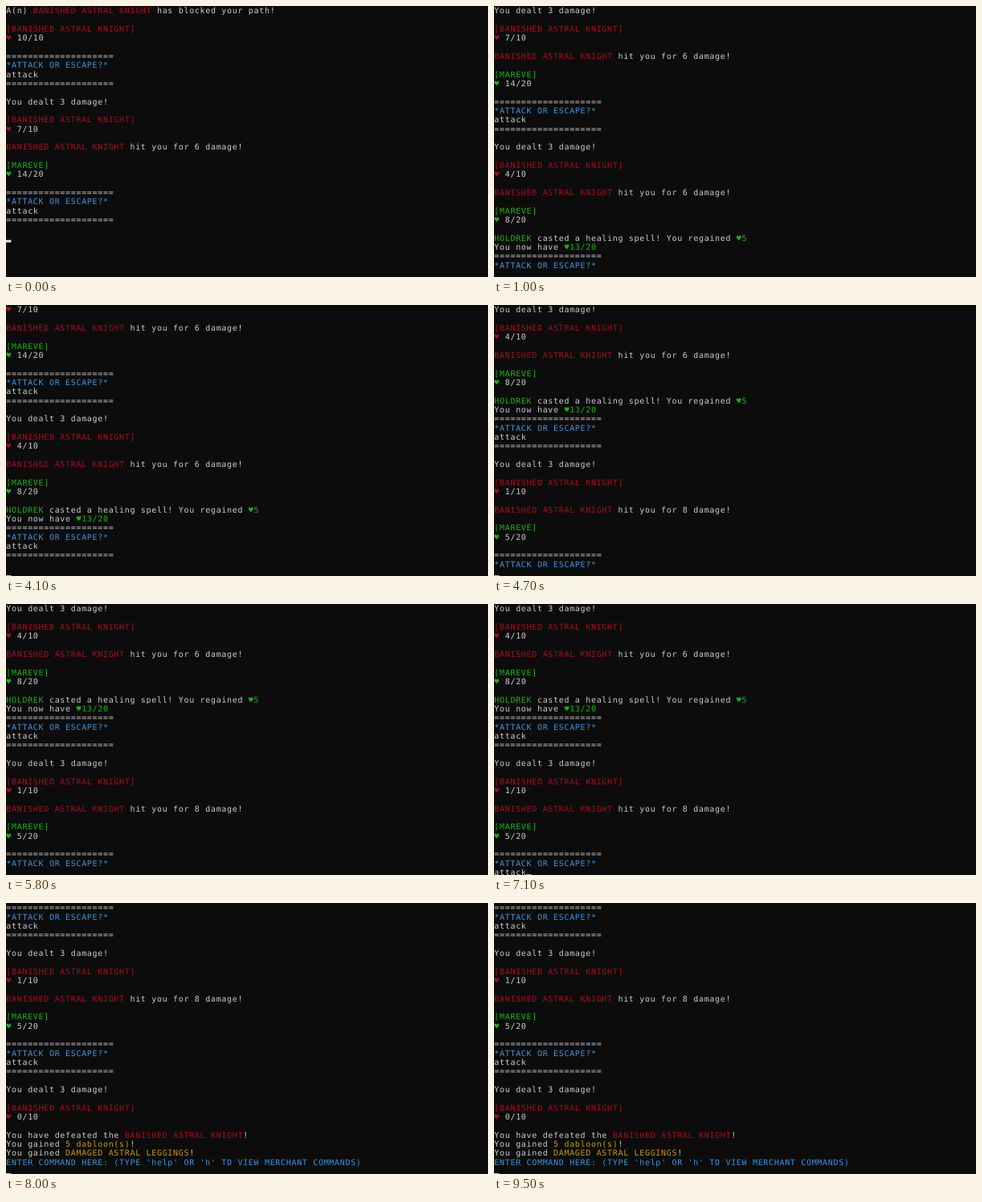
An HTML page with a canvas for the animation above (9.6 s loop, 600 px wide and 338 px high).

```html
<!DOCTYPE html>
<html lang="en">
<head>
<meta charset="utf-8">
<title>Terminal battle</title>
<style>
  html, body { margin: 0; width: 100%; height: 100%; overflow: hidden; background: #0c0c0c; }
  canvas { display: block; }
</style>
</head>
<body>
<canvas id="screen" width="600" height="338"></canvas>
<script>
const ctx = document.getElementById('screen').getContext('2d');

const LOOP = 9600;
const CELL_W = 6.7, CELL_H = 11.34, BASELINE = 9.2;
const VISIBLE_ROWS = 29;
const BLINK = 517, BLINK_START = 220;
const BACKGROUND = '#0c0c0c', TEXT = '#cccccc', CURSOR = '#e6e6e6';

const white = s => [TEXT, s];
const red = s => ['#a80d20', s];
const green = s => ['#18b414', s];
const blue = s => ['#3a96dd', s];
const yellow = s => ['#c19c00', s];

const ENEMY = 'BANISHED ASTRAL KNIGHT', PLAYER = 'MAREVE', HEALER = 'HOLDREK';
const COMMAND = 'attack';

// A line is a list of coloured runs.
const blank = [];
const rule = [white('='.repeat(20))];
const prompt = [rule, [blue('*ATTACK OR ESCAPE?*')]];
const entered = [[white(COMMAND)], rule, blank];
const status = (paint, name, health) => [[paint(`[${name}]`)], [paint('♥'), white(' ' + health)]];
const enemyStatus = hp => status(red, ENEMY, hp + '/10');
const strike = hp => [[white('You dealt 3 damage!')], blank, ...enemyStatus(hp), blank];
const counter = (damage, hp) => [
  [red(ENEMY), white(` hit you for ${damage} damage!`)], blank,
  ...status(green, PLAYER, hp + '/20'), blank
];

const opening = [
  [white('A(n) '), red(ENEMY), white(' has blocked your path!')], blank,
  ...enemyStatus(10), blank, ...prompt, ...entered,
  ...strike(7), ...counter(6, 14), ...prompt, ...entered
];
const healing = [
  [green(HEALER), white(' casted a healing spell! You regained '), green('♥5')],
  [white('You now have '), green('♥13/20')]
];
const victory = [
  [white('You have defeated the '), red(ENEMY), white('!')],
  [white('You gained '), yellow('5 dabloon(s)'), white('!')],
  [white('You gained '), yellow('DAMAGED ASTRAL LEGGINGS'), white('!')],
  [blue("ENTER COMMAND HERE: (TYPE 'help' OR 'h' TO VIEW MERCHANT COMMANDS)")]
];

// Each event holds the log and the pending input from its time onward.
const events = [{ time: 0, log: opening, input: '' }];
const latestLog = () => events[events.length - 1].log;
const print = (time, lines) => events.push({ time, log: [...latestLog(), ...lines], input: '' });
function type(start, interval) {
  for (let i = 1; i <= COMMAND.length; i++) {
    events.push({ time: start + (i - 1) * interval, log: latestLog(), input: COMMAND.slice(0, i) });
  }
}

print(200, [...strike(4), ...counter(6, 8), ...healing, ...prompt]);
type(3300, 100);
print(3950, entered);
print(4550, [...strike(1), ...counter(8, 5), ...prompt]);
type(6500, 100);
print(7250, entered);
print(7900, [...strike(0), ...victory]);

// Glyphs sit in the middle of their terminal cells.
function drawLine(runs, row) {
  let col = 0;
  for (const [color, text] of runs) {
    ctx.fillStyle = color;
    for (const char of text) {
      if (char !== ' ') ctx.fillText(char, (col + 0.5) * CELL_W, row * CELL_H + BASELINE);
      col++;
    }
  }
}

// Cursor movement keeps the cursor lit through the next blink tick.
function cursorVisible(time, lastMove) {
  const tick = t => Math.floor((t - BLINK_START) / BLINK);
  const passed = tick(time) - tick(lastMove);
  return passed === 0 || passed % 2 === 1;
}

function draw(time) {
  const current = events.filter(e => e.time <= time).pop();
  const { log, input } = current;
  const visible = log.slice(-VISIBLE_ROWS);

  ctx.fillStyle = BACKGROUND;
  ctx.fillRect(0, 0, 600, 338);
  ctx.font = '10px "DejaVu Sans Mono", monospace';
  ctx.textRendering = 'geometricPrecision';
  ctx.textAlign = 'center';
  ctx.textBaseline = 'alphabetic';
  visible.forEach(drawLine);
  drawLine([white(input)], visible.length);

  if (cursorVisible(time, current.time)) {
    ctx.fillStyle = CURSOR;
    ctx.fillRect(input.length * CELL_W, visible.length * CELL_H + 8.3, CELL_W - 0.3, 3);
  }
}

const start = performance.now();
function frame() {
  draw((performance.now() - start) % LOOP);
  requestAnimationFrame(frame);
}
frame();
</script>
</body>
</html>
```
